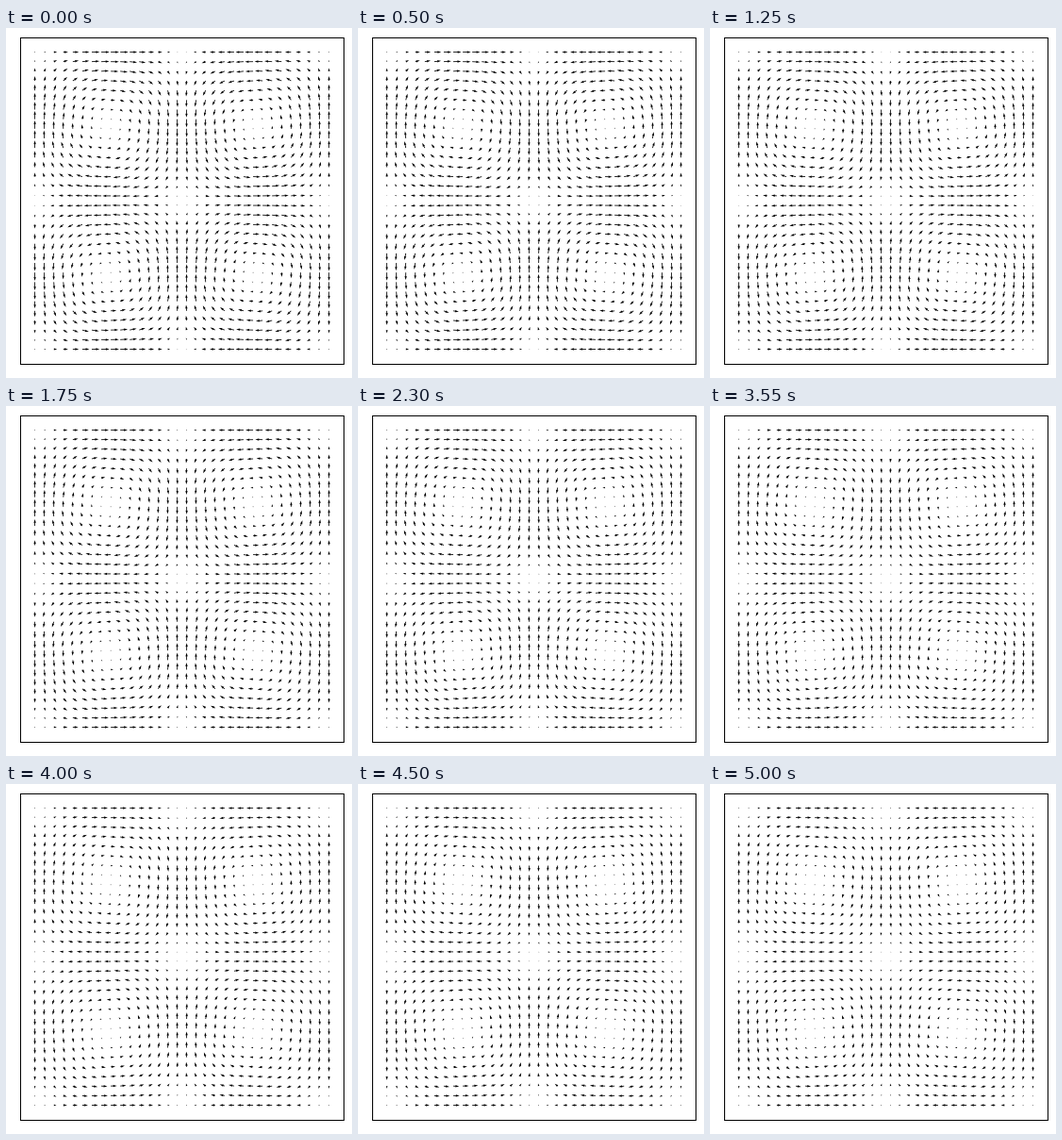
Animation of 367 by 371 pixels, one loop 5050 ms. Source, as a matplotlib script:

```python
import numpy as np
import matplotlib.pyplot as plt
from matplotlib.animation import FuncAnimation

W, H, DPI = 367, 371, 100
LEFT, TOP, RIGHT, BOTTOM = 15, 9.8, 358.2, 356.2
FRAMES, STEP_MS = 101, 50
VISCOSITY = 0.028

fig = plt.figure(figsize=(W / DPI, H / DPI), dpi=DPI, facecolor="white")
ax = fig.add_axes([LEFT / W, 1 - BOTTOM / H,
                   (RIGHT - LEFT) / W, (BOTTOM - TOP) / H])
ax.set_xticks([])
ax.set_yticks([])
for spine in ax.spines.values():
    spine.set_linewidth(0.72)

# Decaying Taylor-Green vortices on a 32 x 32 grid
side = np.linspace(0, 2 * np.pi, 32)
x, y = np.meshgrid(side, side)
u0 = np.sin(x) * np.cos(y)
v0 = -np.cos(x) * np.sin(y)

margin = 0.05 * 2 * np.pi
ax.set_xlim(-margin, 2 * np.pi + margin)
ax.set_ylim(-margin, 2 * np.pi + margin)

# Fixed scale, so the arrows shrink as the flow decays
scale = 1.8 * np.hypot(u0, v0).mean() * len(side)
arrows = ax.quiver(x, y, u0, v0, scale=scale, scale_units="width",
                   units="width", width=0.0024, color="black")


def draw(frame):
    t = frame * STEP_MS / 1000
    decay = np.exp(-2 * VISCOSITY * t)
    arrows.set_UVC(u0 * decay, v0 * decay)
    return (arrows,)


anim = FuncAnimation(fig, draw, frames=FRAMES, interval=STEP_MS,
                     repeat=True, repeat_delay=0, blit=False)
plt.show()
```
